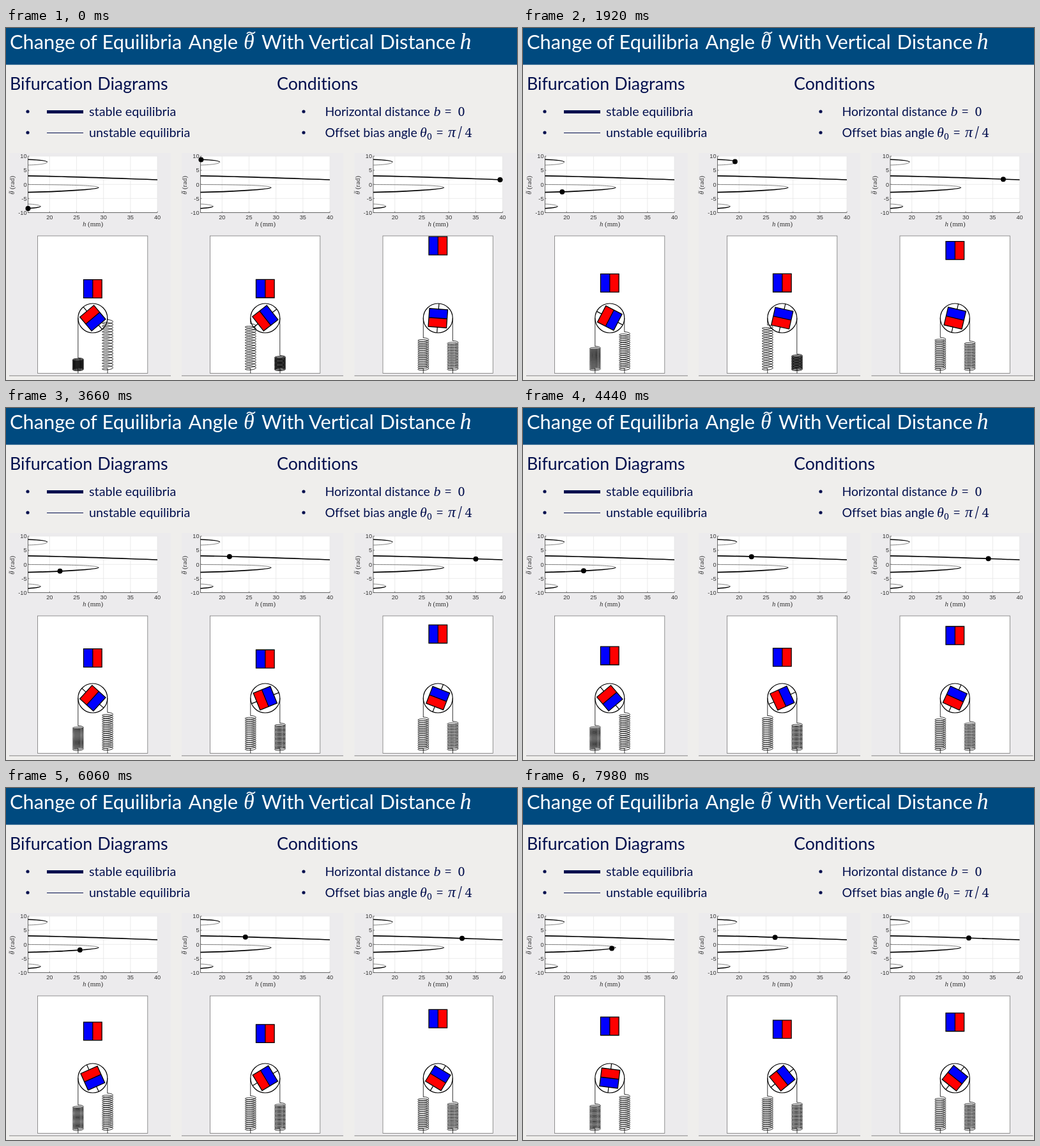
Animation of 800x552 px, one loop 8 s. Source, as an HTML page:

```html
<!DOCTYPE html>
<html lang="en">
<head>
<meta charset="utf-8">
<title>Change of Equilibria Angle</title>
<style>
html, body { margin: 0; width: 100%; height: 100%; overflow: hidden; background: #efeeec; }
svg { display: block; width: 800px; height: 552px; }
text { font-family: Lato, sans-serif; font-variant-ligatures: none; fill: #03104e; }
.title text { fill: #fff; }
text.math { font-family: "Noto Serif", serif; }
text.math.it { font-family: "Liberation Serif", serif; }
.it { font-style: italic; }
text.tick { font-family: "Liberation Sans", sans-serif; font-size: 9.2px; fill: #333; }
text.label { font-family: "Liberation Serif", serif; font-size: 10.8px; fill: #333; }
.line { fill: none; stroke: #000; }
</style>
</head>
<body>
<svg id="stage" viewBox="0 0 800 552"></svg>
<script>
const FRAME = 60, LOOP = 8000;
const PANEL_X = [0, 270, 540.5];
const WHEEL = { x: 135.8, y: 455, r: 23 };
const stage = document.getElementById('stage');

// Keys per panel: time in ms, marker x, wheel angle in degrees. Equal times make a jump.
const MOTION = [
  [[0, 34.5, -580], [600, 43, -567], [1200, 51.5, -549], [1380, 54, -536], [1380, 54, -246],
   [2640, 71, -238], [3660, 84.5, -228], [5160, 104.5, -213], [6060, 115.8, -204],
   [7200, 129.8, -190], [7980, 139, -173]],
  [[0, 35.4, 412], [1200, 52.4, 392], [1740, 59.9, 380], [2160, 64.6, 363], [2160, 64.6, 75],
   [2640, 68.9, 72], [3660, 79.9, 68], [5160, 95, 63], [6060, 104.8, 59], [7980, 124.6, 51]],
  [[0, 233, 4], [1200, 218.5, 10], [2640, 204.3, 16.5], [3660, 195, 21],
   [5160, 181.7, 28], [6060, 173.5, 31.5], [7980, 157.4, 39]]
];

const rad = degrees => degrees * Math.PI / 180;
const plotX = h => 34.5 + (h - 16) * 8.44;
const plotY = theta => 245.2 - theta * 4.42;
const text = (x, y, size, str, cls = '') =>
  `<text x="${x}" y="${y}" font-size="${size}" class="${cls}">${str}</text>`;
const segment = (x1, y1, x2, y2, color, width) =>
  `<path d="M${x1} ${y1}L${x2} ${y2}" stroke="${color}" stroke-width="${width}"/>`;
const curve = (d, color, width) =>
  `<path d="${d}" fill="none" stroke="${color}" stroke-width="${width}"/>`;
const bullet = (x, y) => `<circle cx="${x}" cy="${y}" r="2.6" fill="#03104e"/>`;

function heading() {
  const words = [[6, 'Change'], [115, 'of'], [150.5, 'Equilibria'], [285.6, 'Angle'],
                 [400, 'With'], [474, 'Vertical'], [585.6, 'Distance']];
  return `<rect width="800" height="57.6" fill="#004a7f"/><g class="title">` +
    words.map(([x, word]) => text(x, 33, 30.8, word)).join('') +
    text(372, 33, 34, 'θ', 'math it') + text(710.5, 33, 36, 'h', 'math it') +
    curve('M377 9q3-4 6.5-1.5t6.5-1.5', '#fff', 1.7) + '</g>' +
    text(6, 97, 26.8, 'Bifurcation') + text(143.3, 97, 26.8, 'Diagrams') +
    text(424, 97, 26.8, 'Conditions') +
    [131, 164].map(y => bullet(34, y) + bullet(466, y)).join('') +
    segment(64, 131.5, 121, 131.5, '#03104e', 5) +
    segment(64, 164.5, 121, 164.5, '#03104e', 1.2) +
    text(130, 138, 19.8, 'stable equilibria') + text(130, 171, 19.8, 'unstable equilibria') +
    text(499.5, 138, 19.4, 'Horizontal distance') + text(499.5, 171, 19.5, 'Offset bias angle') +
    text(669.5, 138, 22, 'b', 'math it') + text(686.5, 138, 20, '=', 'math') +
    text(707.5, 138, 19.5, '0', 'math') +
    text(648, 171, 22, 'θ', 'math it') + text(659, 175, 14, '0', 'math') +
    text(673.5, 171, 20, '=', 'math') + text(692, 171, 24, 'π', 'math it') +
    text(707.5, 171, 22, '/', 'math') + text(718.5, 171, 19.5, '4', 'math');
}

function plot() {
  const left = 34.5, right = 237, top = 201, bottom = 289.5;
  let out = `<rect x="${left}" y="${top}" width="${right - left}" height="${bottom - top}" fill="#fff"/>`;
  for (const h of [20, 25, 30, 35, 40]) {
    const x = plotX(h);
    out += segment(x, top, x, bottom, '#e6e6e6', .8) + segment(x, bottom - 2, x, bottom, '#444', .7) +
      `<text class="tick" x="${x}" y="300.3" text-anchor="middle">${h}</text>`;
  }
  for (const theta of [10, 5, 0, -5, -10]) {
    const y = plotY(theta);
    out += segment(left, y, right, y, '#e6e6e6', .8) + segment(left, y, left + 2, y, '#444', .7) +
      `<text class="tick" x="32.5" y="${y + 3.3}" text-anchor="end">${theta}</text>`;
  }
  return out +
    curve(`M${left} ${top}V${bottom}H${right}`, '#444', .8) +
    curve('M64.5 210.3C64.5 213 51 214.5 34.5 215', '#777', .9) +
    curve('M145 250C145 246.7 90 245.7 34.5 245.5', '#777', .9) +
    curve('M54 279.6C54 277.8 44 276.3 34.5 276', '#777', .9) +
    curve('M34.5 206.2C51 206.8 64.5 208.2 64.5 210.3', '#000', 1.6) +
    curve('M34.5 231.9C90 232.5 170 235.7 237 238', '#000', 1.6) +
    curve('M34.5 257.6C82 256.8 145 253 145 250', '#000', 1.6) +
    curve('M34.5 283C44 282.4 54 281.3 54 279.6', '#000', 1.6) +
    `<text class="label" x="136" y="310.5" text-anchor="middle"><tspan class="it">h</tspan> (mm)</text>` +
    `<g transform="translate(13.3 261) rotate(-90)">` +
    `<text class="label"><tspan class="it">θ</tspan> (rad)</text>` +
    curve('M1.5-7.8q1-1.2 2-.4t2-.4', '#333', .7) + '</g>';
}

// Two-coloured square magnet centred on the origin, blue half on the left.
const magnet = () =>
  `<rect x="-14.3" y="-14.3" width="14.3" height="28.6" fill="#00f"/>` +
  `<rect y="-14.3" width="14.3" height="28.6" fill="#f00"/>` +
  `<path class="line" stroke-width="1.3" d="M-14.3-14.3h28.6v28.6h-28.6zM0-14.3v28.6"/>`;

function panel(x) {
  return `<g class="panel" transform="translate(${x})">
    <rect x="5" y="196" width="253" height="349" fill="#ecebed"/>
    ${plot()}
    ${segment(5, 545.3, 258, 545.3, '#888', 1)}
    <rect x="49.5" y="326" width="172.3" height="215.5" fill="#fff" stroke="#777" stroke-width=".8"/>
    <g class="driver">${magnet()}</g>
    <circle class="line" cx="${WHEEL.x}" cy="${WHEEL.y}" r="${WHEEL.r}" stroke-width="1.2"/>
    <g class="rotor"><path class="line" stroke-width="1.2" d="M-23 0H23"/>${magnet()}</g>
    <path class="springs line" stroke-width=".8"/>
    <circle class="marker" r="4"/>
  </g>`;
}

// A cord from the wheel, a coil down to the floor and its short tail.
function spring(x, cordX, top) {
  const turns = 17, steps = turns * 16, bottom = 536;
  let d = `M${cordX} ${WHEEL.y}V${top}M${x} ${top}`;
  for (let i = 0; i <= steps; i++) {
    const a = i / 16 * 2 * Math.PI;
    const px = x + 8.5 * Math.sin(a);
    const py = top + 2 + (bottom - top - 2) * i / steps - 2.2 * Math.cos(a);
    d += `L${px.toFixed(2)} ${py.toFixed(2)}`;
  }
  return d + `Q${x} 539 ${x} 541.5`;
}

function sample(keys, time) {
  let i = keys.length - 2;
  while (i > 0 && keys[i][0] > time) i--;
  const [t0, x0, a0] = keys[i], [t1, x1, a1] = keys[i + 1];
  const k = Math.min(1, (time - t0) / (t1 - t0));
  return [x0 + (x1 - x0) * k, a0 + (a1 - a0) * k];
}

stage.innerHTML = heading() + PANEL_X.map(panel).join('');
const panels = [...stage.querySelectorAll('.panel')].map(g => ({
  driver: g.querySelector('.driver'),
  rotor: g.querySelector('.rotor'),
  springs: g.querySelector('.springs'),
  marker: g.querySelector('.marker')
}));

function draw(time) {
  panels.forEach((part, i) => {
    const [x, angle] = sample(MOTION[i], time);
    const wound = rad(angle + 580);
    part.marker.setAttribute('cx', x);
    part.marker.setAttribute('cy', plotY(rad(angle + 90)));
    part.driver.setAttribute('transform', `translate(${WHEEL.x} ${409 - .34 * (x - 34.5)})`);
    part.rotor.setAttribute('transform', `translate(${WHEEL.x} ${WHEEL.y}) rotate(${angle + 90})`);
    part.springs.setAttribute('d',
      spring(112.8, WHEEL.x - WHEEL.r, 517.5 - 3.1 * wound) +
      spring(159, WHEEL.x + WHEEL.r, 457.5 + 3.25 * wound));
  });
}

const start = performance.now();
function tick() {
  const elapsed = (performance.now() - start) % LOOP;
  draw(Math.floor(elapsed / FRAME) * FRAME);
  requestAnimationFrame(tick);
}
tick();
</script>
</body>
</html>
```
